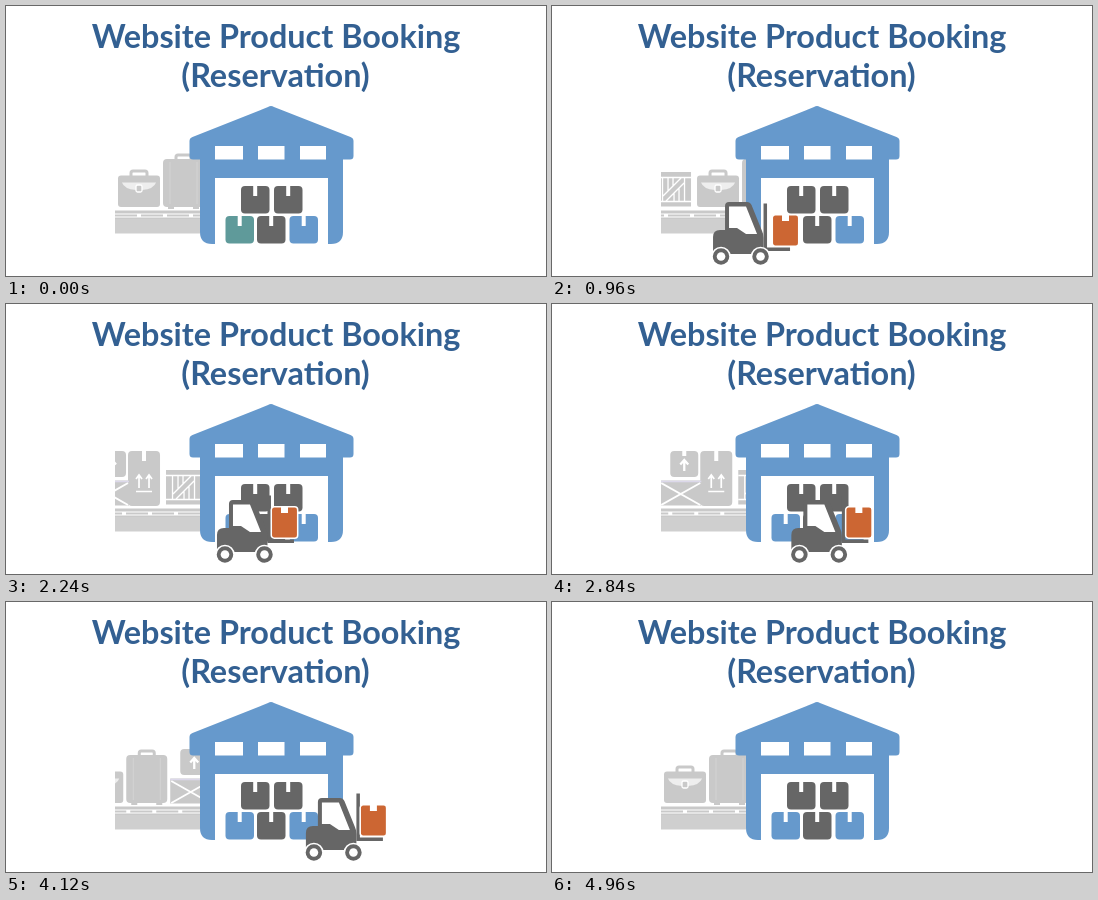
Animation of 540 by 270 pixels, one loop 5000 ms. Source, as an HTML page:

```html
<!DOCTYPE html>
<html lang="en">
<head>
<meta charset="utf-8">
<title>Website Product Booking</title>
<style>
  html, body { margin: 0; width: 100%; height: 100%; overflow: hidden; background: #fff; }
  svg { display: block; width: 100vw; height: 100vh; }
  text { font: 700 32.4px Lato, Carlito, sans-serif; fill: #336092; text-anchor: middle; }
</style>
</head>
<body>
<svg viewBox="0 0 540 270">
  <defs>
    <clipPath id="beltClip"><rect x="109" y="140" width="85" height="95"/></clipPath>

    <g id="box">
      <rect width="28.5" height="27.5" rx="4"/>
      <path d="M12.2 0h4v10h-4z" fill="#fff"/>
    </g>

    <g id="goods" fill="#c9c9c9">
      <!-- suitcase -->
      <g transform="translate(157 0)">
        <path d="M13 154v-3q0-2 2-2h11q2 0 2 2v3" fill="none" stroke="#c9c9c9" stroke-width="3"/>
        <rect y="153" width="41" height="48" rx="4"/>
        <path d="M5 200h6v3h-6zM30 200h6v3h-6z"/>
        <path d="M7 156v42M34 156v42" stroke="#d3d3d3"/>
      </g>
      <!-- briefcase -->
      <g transform="translate(112 0)">
        <path d="M13 171v-4q0-2 2-2h12q2 0 2 2v4" fill="none" stroke="#c9c9c9" stroke-width="3"/>
        <rect y="169.500" width="42" height="31.500" rx="3"/>
        <path d="M4 176.500H38Q36 183 24 184H18Q6 183 4 176.500Z" fill="#eee"/>
        <rect x="18" y="179" width="6" height="7" rx="1.500" stroke="#fff" stroke-width="1.300"/>
      </g>
      <!-- slatted crate -->
      <g transform="translate(71 0)">
        <rect y="166" width="35" height="34.500"/>
        <path d="M0 171.500H35M0 195.500H35M6.500 172v23M28.500 172v23M7 190L25 172M10 195L28 177M12 172v13M17 172v8M18 195v-8M23 195v-13"
              fill="none" stroke="#fff" stroke-width="1.300"/>
      </g>
      <!-- tall carton -->
      <g transform="translate(33 0)">
        <rect y="147" width="32" height="55" rx="4"/>
        <path d="M14 147h4v10h-4z" fill="#fff"/>
        <path d="M11 184v-12M8 175l3-4 3 4M21 184v-12M18 175l3-4 3 4M8 187.500H24" fill="none" stroke="#fff" stroke-width="1.700"/>
      </g>
      <!-- small carton on a braced crate -->
      <g transform="translate(3 0)">
        <rect y="147" width="28" height="26" rx="4"/>
        <path d="M12 147h4v5h-4z" fill="#fff"/>
        <path d="M14 167v-10M10 160.500l4-4.500 4 4.500" fill="none" stroke="#fff" stroke-width="2.300"/>
        <rect x="-10" y="176.500" width="41" height="25"/>
        <path d="M-10 177.500H31" stroke="#dcd8ea" stroke-width="1.500"/>
        <path d="M-9 179L30 201M-9 201L30 179" stroke="#fff" stroke-width="1.800"/>
      </g>
    </g>
  </defs>

  <rect width="540" height="270" fill="#fff"/>
  <text x="270" y="42">Website Product Booking</text>
  <text x="269.500" y="81">(Reservation)</text>

  <g clip-path="url(#beltClip)">
    <g id="load">
      <use href="#goods"/>
      <use href="#goods" x="-208"/>
    </g>
    <path d="M109 204.500h85v3h-85zM109 211.500h85v2h-85z" fill="#c9c9c9"/>
    <path id="dashes" d="M109 209.500h85" stroke="#c9c9c9" stroke-width="2" stroke-dasharray="22 4"/>
    <rect x="109" y="213" width="85" height="14.500" fill="#cfcfcf"/>
  </g>

  <g fill="#6699cc">
    <path d="M262 101q3-2 6 0L344.500 131q3 1 3 4V150q0 3.500-3.500 3.500H337V226q0 12-12 12H322V172H209V238H206q-12 0-12-12V153.500H187q-3.500 0-3.500-3.500V135q0-3 3-4Z"/>
    <path d="M209 140h28v13.500h-28zM252 140h26.500v13.500h-26.500zM294 140h26v13.500h-26z" fill="#fff"/>
    <g fill="#666">
      <use href="#box" x="235" y="180"/>
      <use href="#box" x="268" y="180"/>
      <use href="#box" x="251" y="210"/>
    </g>
    <use href="#box" x="283.500" y="210"/>
    <use href="#box" id="stored" x="219.500" y="210"/>
  </g>

  <g id="truck">
    <path id="fork" d="M50.500 197.500h3.500v44h23v3.500h-26.500z" fill="#666"/>
    <path d="M0 231q0-7 7-7h5V200q0-4 4-4H34q3 0 4.500 3L49 225q1.500 3 1.500 7v16h-48q-2.500 0-2.500-3Z" fill="#666"/>
    <path d="M16 200.500H33L44 228H33L24 222H16Z" fill="#fff"/>
    <g fill="#666" stroke="#fff" stroke-width="1.500">
      <circle cx="8" cy="250.500" r="9"/>
      <circle cx="47.500" cy="250.500" r="9"/>
    </g>
    <g fill="#fff">
      <circle cx="8" cy="250.500" r="4.300"/>
      <circle cx="47.500" cy="250.500" r="4.300"/>
    </g>
  </g>
  <g id="cargo">
    <rect x="-.700" y="-.700" width="26.400" height="31.400" rx="3" fill="#cc6633" stroke="#fff" stroke-width="1.500"/>
    <path d="M9 -.500h7v6h-7z" fill="#fff"/>
  </g>
</svg>
<script>
  const LOOP = 5000, STEP = 40;
  const SPEED = 0.0473;          // truck, px per ms
  const PERIOD = 208;            // length of the row of goods
  const ARRIVE = 1065, LEAVE = 1289;
  const TEAL = [95, 154, 154], ORANGE = [204, 102, 51];

  const el = id => document.getElementById(id);
  const load = el('load'), dashes = el('dashes'), stored = el('stored');
  const truck = el('truck'), fork = el('fork'), cargo = el('cargo');

  const ramp = (t, a, b) => Math.min(1, Math.max(0, (t - a) / (b - a)));
  const move = (node, x, y) => node.setAttribute('transform', `translate(${x} ${y})`);
  const mix = (a, b, k) => `rgb(${a.map((v, i) => Math.round(v + (b[i] - v) * k))})`;

  function draw(t) {
    const shift = PERIOD * ramp(t, 205, 4960);
    move(load, shift, 0);
    dashes.setAttribute('stroke-dashoffset', -shift);

    const ride = SPEED * Math.max(0, t - LEAVE);
    const left = 166 + SPEED * Math.min(0, t - ARRIVE) + ride;
    const lift = -6 * ramp(t, ARRIVE, LEAVE);
    move(truck, left, 0);
    move(fork, 0, lift);
    move(cargo, 221 + ride, 209.5 + lift);

    const show = ramp(t, 560, 760), hide = ramp(t, 4700, 4940);
    truck.setAttribute('opacity', show * (1 - hide));
    cargo.setAttribute('opacity', show * (1 - hide));

    const refilled = t >= 1900;
    stored.setAttribute('fill', refilled ? '#6699cc' : mix(TEAL, ORANGE, ramp(t, 0, 400)));
    stored.setAttribute('opacity', refilled ? 1 : 1 - show);
  }

  function tick() {
    const t = performance.now() % LOOP;
    draw(Math.floor(t / STEP) * STEP);
    requestAnimationFrame(tick);
  }
  tick();
</script>
</body>
</html>
```
